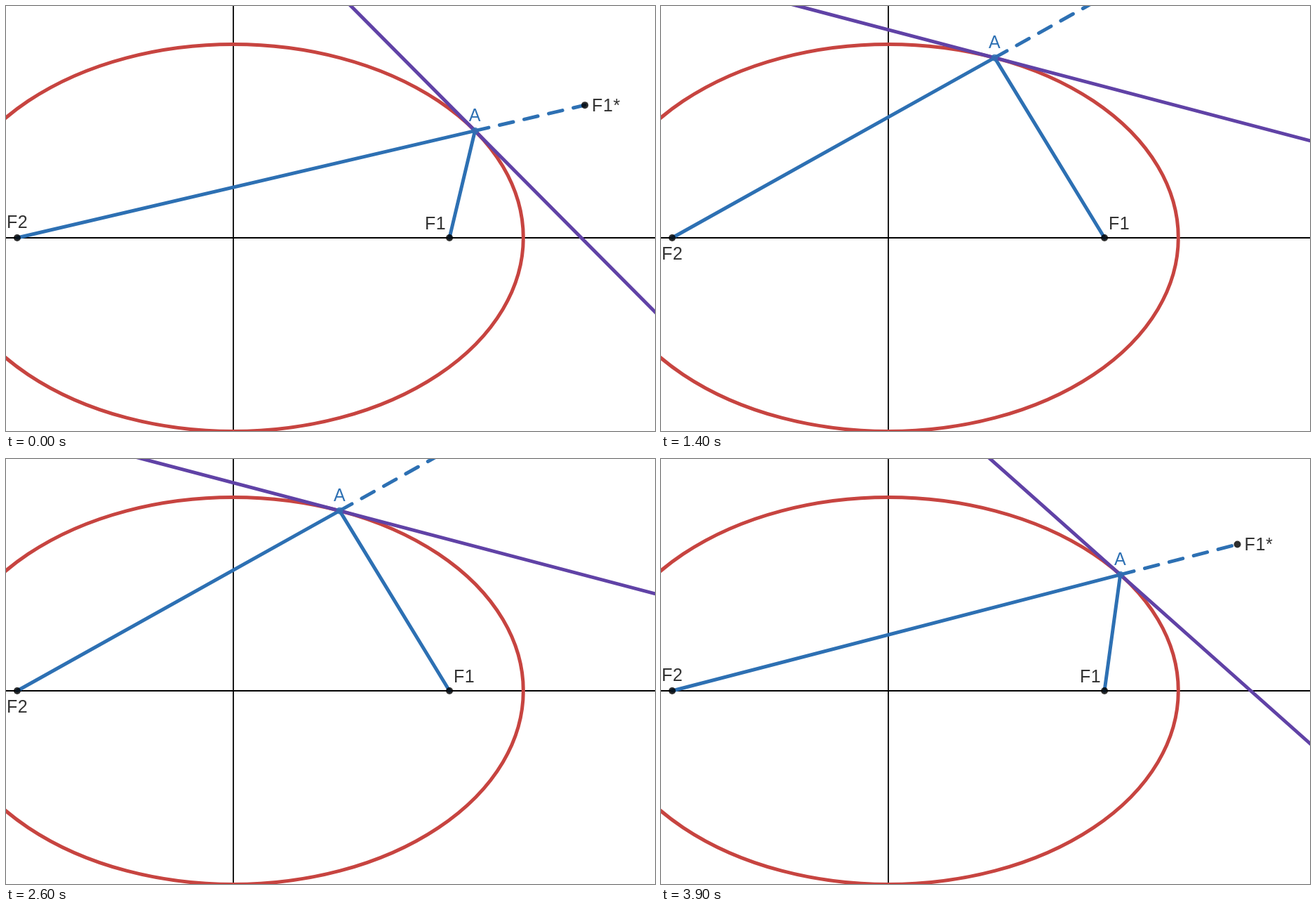
Write an HTML page with a canvas that moves like this. It is 925 px wide and 605 px high and loops after 4 s.

```html
<!DOCTYPE html>
<html lang="en">
<head>
<meta charset="utf-8">
<title>Reflection property of the ellipse</title>
<style>
  html, body { margin: 0; width: 100%; height: 100%; overflow: hidden; background: #fff; }
  canvas { display: block; }
</style>
</head>
<body>
<canvas id="stage" width="925" height="605"></canvas>
<script>
const ctx = document.getElementById('stage').getContext('2d');
const W = 925, H = 605, CX = 324, CY = 330;
const UNIT = 137.77, RX = 3 * UNIT, RY = 2 * UNIT, FOCUS = Math.sqrt(5) * UNIT;
const RED = '#c74440', BLUE = '#2d70b3', PURPLE = '#6042a6', BLACK = '#000';
const F1 = [CX + FOCUS, CY], F2 = [CX - FOCUS, CY];

function line(from, to, color, width = 5, dash = []) {
  ctx.strokeStyle = color;
  ctx.lineWidth = width;
  ctx.setLineDash(dash);
  ctx.beginPath();
  ctx.moveTo(...from);
  ctx.lineTo(...to);
  ctx.stroke();
  ctx.setLineDash([]);
}

function dot([x, y], color) {
  ctx.globalAlpha = 0.82;
  ctx.fillStyle = color;
  ctx.beginPath();
  ctx.arc(x, y, 5, 0, 2 * Math.PI);
  ctx.fill();
  ctx.globalAlpha = 1;
}

function label(text, x, y, color = '#333', align = 'left') {
  ctx.fillStyle = color;
  ctx.textAlign = align;
  ctx.fillText(text, x, y);
}

function draw(time) {
  // A slides from x = 2.5 to 0.5 and back in steps of 0.1
  const step = Math.floor(time / 100) % 40;
  const u = 0.5 + Math.abs(20 - step) / 10;
  const dx = u * UNIT, dy = RY * Math.sqrt(1 - u * u / 9);
  const A = [CX + dx, CY - dy];
  const reach = Math.hypot(A[0] - F1[0], dy);
  const mirror = [A[0] + reach, A[1] - reach * dy / (A[0] - F2[0])];
  const slope = (RY * RY * dx) / (RX * RX * dy);
  const tangentAt = x => [x, A[1] + slope * (x - A[0])];

  ctx.fillStyle = '#fff';
  ctx.fillRect(0, 0, W, H);
  ctx.lineCap = 'round';
  line([0, CY], [W, CY], BLACK, 1.8);
  line([CX, 0], [CX, H], BLACK, 1.8);

  ctx.strokeStyle = RED;
  ctx.lineWidth = 5;
  ctx.beginPath();
  ctx.ellipse(CX, CY, RX, RY, 0, 0, 2 * Math.PI);
  ctx.stroke();

  line(F2, A, BLUE);
  line(A, F1, BLUE);
  line(A, mirror, BLUE, 5, [20, 16]);
  line(tangentAt(-20), tangentAt(W + 20), PURPLE);

  dot(F1, BLACK);
  dot(F2, BLACK);
  dot(mirror, BLACK);
  dot(A, BLUE);

  ctx.font = '25px "Liberation Sans", Arial, sans-serif';
  ctx.letterSpacing = '0.6px';
  label('F1', u > 2.236 ? 597 : 638, 318);
  label('F2', 1, u > 2.05 ? 316 : 361);
  label('F1*', mirror[0] + 10, mirror[1] + 9);
  label('A', A[0], A[1] - 14, BLUE, 'center');
}

function tick() {
  draw(performance.now());
  requestAnimationFrame(tick);
}
tick();
</script>
</body>
</html>
```
